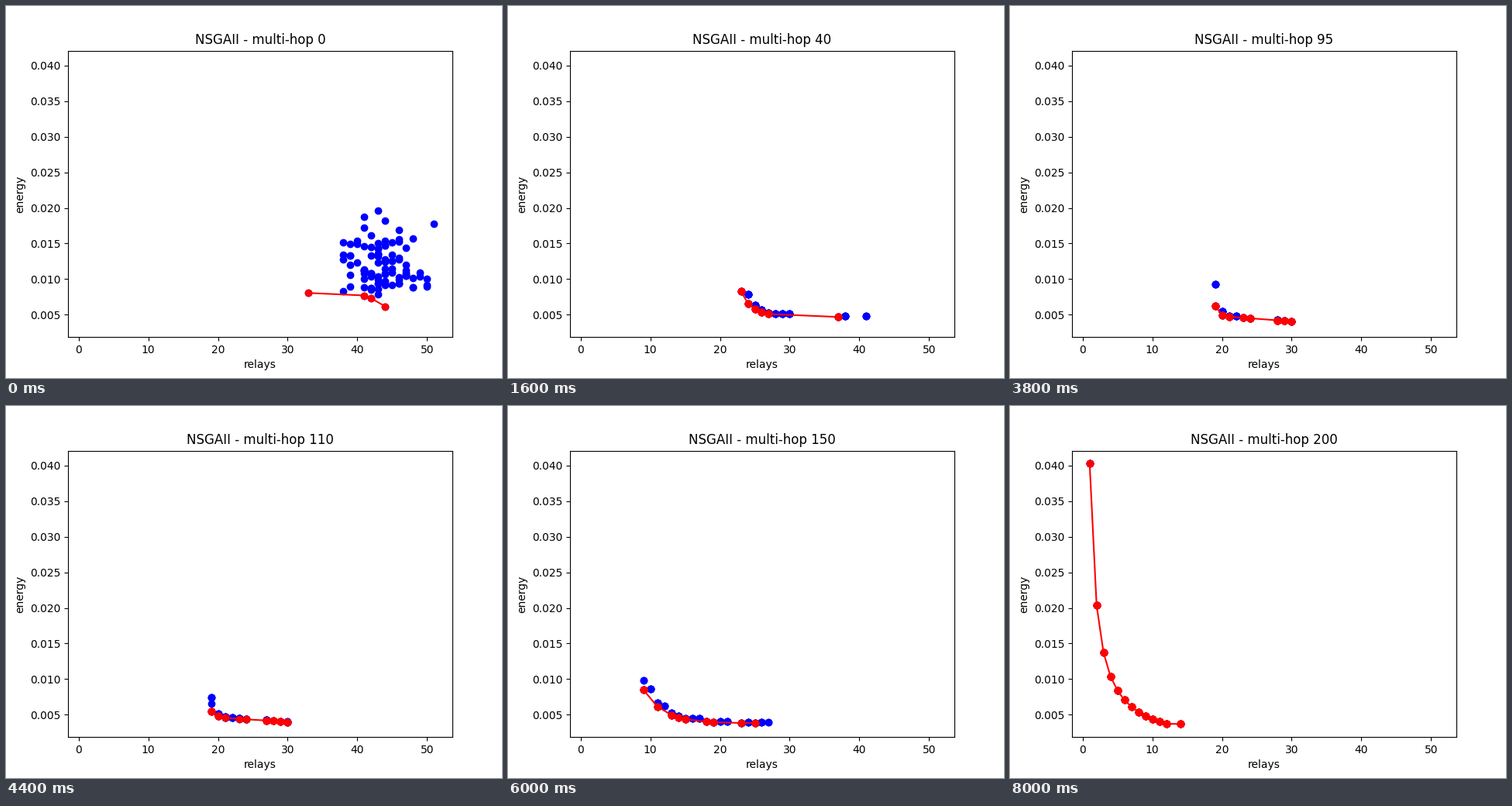
Write a matplotlib script that moves like this. It is 640x480 px and loops after 8200 ms.

```python
import numpy as np
import matplotlib.pyplot as plt
from matplotlib.animation import FuncAnimation

SIZE = 100     # individuals in the population
STEP = 5       # generations per picture
LAST = 200
rng = np.random.default_rng(4)
stages = {}    # generation -> individuals (relays, energy in 1e-4)


def floor(gen):
    """Lowest energy reached so far."""
    return 36 + 20 * np.exp(-gen / 65)


def knee(gen, left, right, start, slope, half):
    """Steep drop from start that flattens into a gentle slope."""
    amp = start - floor(gen) - slope * (right - left)
    return lambda x: (floor(gen) + slope * (right - x)
                      + amp * 0.5 ** ((x - left) / half))


def hyperbola(x):
    return 4 + 399 / x


def add_points(gen, pts):
    """Sort along the front and repeat individuals up to SIZE."""
    pts = sorted(pts, key=lambda p: (p[0], -p[1]))
    pick = np.linspace(0, len(pts) - 1, SIZE).round().astype(int)
    stages[gen] = np.array(pts, dtype=float)[pick]


def add_stage(gen, curve, front, idle=(), lag=0.0, stray=None):
    def energy(x):
        return max(curve(x), floor(gen))

    pts = [(x, energy(x)) for x in front]
    pts += [(x, energy(x - lag)) for x in front[1:]]
    # idle members cost about as much as the front member on their left
    pts += [(x, energy(max(f for f in front if f < x)) + 0.8) for x in idle]
    if stray:
        pts.append((front[0], stray))
    add_points(gen, pts)


# random start: a cloud above a few early winners
relays = rng.normal(43.8, 2.9, 88).round().clip(38, 51)
costs = 78 + rng.gamma(1.9, 20, 88).clip(0, 118)
add_points(0, [(33, 80.5), (41, 77), (42, 73), (44, 61.5), *zip(relays, costs)])

add_stage(40, knee(40, 23, 37, 83, 0.2, 1), np.r_[23:28, 37],
          idle=np.r_[28:31, 38, 41], lag=0.8)
add_stage(70, knee(70, 20, 30, 73, 0.35, 0.95), np.r_[20:25, 29:31],
          idle=np.r_[25, 31:33], lag=0.6, stray=100)
add_stage(95, knee(95, 19, 30, 62.5, 0.72, 0.35), np.r_[19:22, 23:25, 28:31],
          idle=[22], lag=0.6, stray=92.5)
add_stage(130, knee(130, 18, 30, 62.5, 0.72, 0.4), np.r_[18:27, 29:31])
add_stage(150, knee(150, 9, 27, 85, 0, 2), np.r_[9:15:2, 14:16, 18:20, 23:26:2],
          idle=np.r_[10:13:2, 16:18, 20:22, 24, 26:28], lag=0.6, stray=98)
add_stage(175, hyperbola, np.r_[1:13, 14:21:3], lag=0.1)
add_stage(LAST, hyperbola, np.r_[1:13, 14])


def evolve(gen):
    """Blend the neighbouring stages; relays stay whole numbers."""
    if gen in stages:
        return stages[gen]
    a = max(g for g in stages if g < gen)
    b = min(g for g in stages if g > gen)
    t = (gen - a) / (b - a)
    (xa, ya), (xb, yb) = stages[a].T, stages[b].T
    x = np.round(xa + (xb - xa) * t)
    y = ya * (yb / ya) ** t ** 0.7
    return np.column_stack([x, y])


def pareto(pts):
    front = []
    for p in sorted(map(tuple, pts)):
        if not front or p[1] < front[-1][1] or p == front[-1]:
            front.append(p)
    return np.array(front)


fig, ax = plt.subplots(figsize=(6.4, 4.8), dpi=100)
cloud = ax.scatter([], [], color="blue")
best = ax.scatter([], [], color="red")
line, = ax.plot([], [], color="red")
ax.set_xlim(-1.53, 53.643)
ax.set_ylim(0.0018537, 0.0420937)
ax.set_xlabel("relays")
ax.set_ylabel("energy")
title = ax.set_title("")


def draw(i):
    gen = i * STEP
    pts = evolve(gen) * (1, 1e-4)
    front = pareto(pts)
    cloud.set_offsets(pts)
    best.set_offsets(front)
    line.set_data(*front.T)
    title.set_text(f"NSGAII - multi-hop {gen}")
    return cloud, best, line, title


anim = FuncAnimation(fig, draw, frames=LAST // STEP + 1, interval=200,
                     repeat=True, repeat_delay=0)
plt.show()
```
